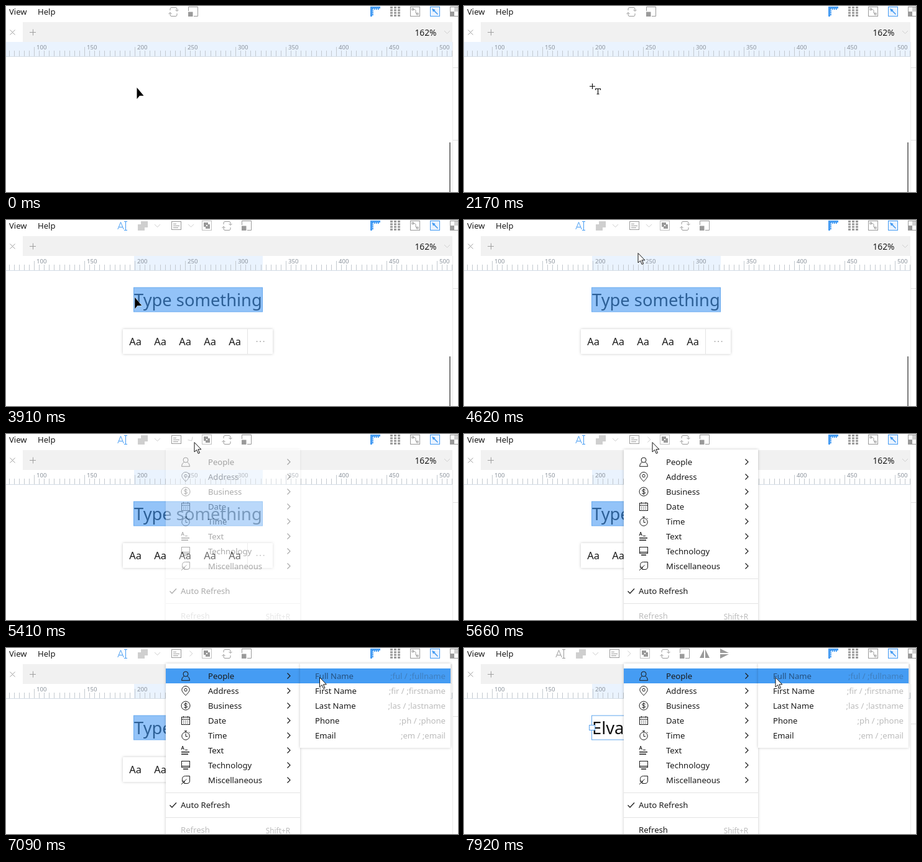
An HTML page for the animation above (8 s loop, 727 by 300 pixels).

```html
<!DOCTYPE html>
<html lang="en">
<head>
<meta charset="utf-8">
<title>Text tool demo</title>
<style>
  html, body { margin: 0; width: 100%; height: 100%; overflow: hidden; background: #fff; }
  svg { display: block; font: 13.1px "Noto Sans", "Open Sans", sans-serif; fill: #1a1a1a; }
  .line { fill: none; stroke: currentColor; }
  .solid { fill: currentColor; }
  .big { font-size: 27.3px; }
  .ruler { font-size: 9.6px; fill: #8a929b; }
  .hint { fill: #bcbcbc; }
  .hot .name { fill: #24507f; }
  .hot .hint { fill: #3f7fbf; }
  .panel { fill: #fff; filter: drop-shadow(0 0 2px rgba(0, 0, 0, .22)); }
</style>
</head>
<body>
<svg id="stage" width="727" height="300" viewBox="0 0 727 300"></svg>
<script>
const LOOP = 8000, FRAME = 70, ROW = 24;
const BLUE = '#459cf3', GREY = '#9a9a9a', PALE = '#cfcfcf', TINT = '#eaf3fe', INK = '#1a1a1a';

const rect = (x, y, w, h, fill, more = '') =>
  `<rect x="${x}" y="${y}" width="${w}" height="${h}" fill="${fill}" ${more}/>`;
const text = (x, y, s, more = '') => `<text x="${x}" y="${y}" ${more}>${s}</text>`;
const line = (d, color, w = 1) => `<path d="${d}" fill="none" stroke="${color}" stroke-width="${w}"/>`;
const group = (id, body) => `<g id="${id}">${body}</g>`;
const at = (x, y, body, color = GREY) =>
  `<g transform="translate(${x} ${y})" color="${color}">${body}</g>`;
const stroke = d => `<path class="line" d="${d}"/>`;
const solid = d => `<path class="solid" d="${d}"/>`;
const ring = (x, y, r) => `<circle class="line" cx="${x}" cy="${y}" r="${r}"/>`;
const box = (x, y, w, h) => rect(x, y, w, h, 'none', 'class="line"');
const fill = (x, y, w, h) => rect(x, y, w, h, 'none', 'class="solid"');
const repeat = (n, f) => Array.from({ length: n }, (_, i) => f(i)).join('');
const frame = box(.5, .5, 15, 15);
const triangles = solid('M0 15H7V1ZM9 1V15H16Z');

const icon = {
  type: stroke('M.8 14L5.5 2.5 10.2 14M2.4 10.5H8.6M13.5 1.5V15.5M11 1.5H16M11 15.5H16'),
  merge: solid('M0 6H5V1H16V11H11V16H0Z'),
  down: stroke('M0 0L4.5 4.5 9 0'),
  list: box(.5, 1.5, 15, 13) + stroke('M3 5.5H8M3 8.5H13M3 11.5H11'),
  mask: `<g opacity=".6">${frame}</g>` + solid('M3 3H10V6H13V13H6V10H3Z') + rect(7, 7, 2, 2, '#fff'),
  refresh: stroke('M3 6V4Q3 1.5 5 1.5H12Q14 1.5 14 4V7M11.5 5L14 7.5 16.5 5' +
    'M14 11V13Q14 15.5 12 15.5H5Q3 15.5 3 13V9.5M.5 12L3 9.5 5.5 12'),
  corner: stroke('M.5 7V.5H15.5V15.5H9') + fill(0, 8.5, 7.5, 7.5),
  flipX: triangles,
  flipY: `<g transform="rotate(90 8 8)">${triangles}</g>`,
  rulers: fill(0, 0, 16, 3) + fill(0, 0, 3, 16) +
    repeat(5, i => fill(i * 3, 0, 2, 5) + fill(0, i * 3, 5, 2)),
  grid: repeat(12, i => fill(i % 3 * 6, (i / 3 | 0) * 4.3, 4, 3)),
  flow: frame + box(3, 3, 2.5, 2.5) + box(10.5, 10.5, 2.5, 2.5) + stroke('M6 4.5Q10 5 9 8T11 11'),
  pen: rect(.5, .5, 15, 15, TINT) + frame + solid('M3 3L8.5 5 7.5 6.3 13 12 12 13 6.3 7.5 5 8.5Z'),
  checker: frame + `<g opacity=".45">${fill(7, 1, 8, 7)}</g>` + fill(1, 8, 6, 7)
};

const items = {
  People: ring(8, 5, 4) + stroke('M5.5 8.5Q1.5 10 1.5 15.3H14.5Q14.5 10 10.5 8.5'),
  Address: ring(8, 6.5, 2.2) + stroke('M8 15.5Q1.8 9.5 1.8 6.5A6.2 6 0 0 1 14.2 6.5Q14.2 9.5 8 15.5Z'),
  Business: ring(8, 8, 7) + stroke('M10.5 6Q10 4.6 8 4.6T5.6 6.3Q5.6 7.6 8 8T10.5 9.8Q10.4 11.4 8 11.4T5.4 10M8 3V13'),
  Date: box(1.5, 2.5, 13, 12) + stroke('M1.5 6H14.5M4.5 .8V3.5M11.5 .8V3.5') +
    repeat(6, i => fill(4 + i % 3 * 3.3, 8.5 + (i / 3 | 0) * 3, 1.5, 1)),
  Time: ring(8, 9, 6.2) + stroke('M8 5V9.5H11M6 .8H10M8 .8V2.8M13 2.5L14.5 4'),
  Text: stroke('M1 7L3.2 1 5.4 7M2 5H5M7 7.5H11') + fill(1, 10, 13, 1.5) + fill(1, 13.5, 11, 1.5),
  Technology: box(1.5, 1.5, 13, 10) + stroke('M1.5 9.5H14.5') + fill(4, 13.5, 8, 1.5),
  Miscellaneous: stroke('M14.5 1.5V9Q14.5 13.5 10 13.5H6L2.5 10V6.5Q2.5 1.5 7.5 1.5ZM1 15L9.5 6.5M6 9.8V13.5M2.5 10H6')
};
const fields = {
  'Full Name': ';ful / ;fullname', 'First Name': ';fir / ;firstname',
  'Last Name': ';las / ;lastname', Phone: ';ph / ;phone', Email: ';em / ;email'
};

// icons stand 32 px apart
const strip = (x, names) => names.map((n, i) => at(x + i * 32, 1, icon[n])).join('');

function ruler() {
  let ticks = '', labels = '';
  for (let i = -5; i < 84; i++) {
    const x = Math.round(45 + i * 8.1) + .5;
    if (x > 718) break;
    const major = i % 10 === 0;
    ticks += `M${x} ${major ? 66 : 72}V81`;
    if (major) labels += text(x + 3.5, 70, 100 + i * 5, 'class="ruler"');
  }
  return line(ticks, '#c3c9cf') + line('M0 81.5H718', '#d3dce5') + labels;
}

function tools() {
  return group('plain', strip(261, ['refresh', 'corner'])) +
    group('rich',
      group('typeIcon', at(179, 1, icon.type, 'inherit')) +
      at(212, 1, icon.merge, PALE) + at(239, 7, icon.down, PALE) + at(266, 1, icon.list) +
      group('fold', at(-4.5, -2.2, icon.down, PALE)) +
      strip(315, ['mask', 'refresh', 'corner']) + group('flips', strip(411, ['flipX', 'flipY'])));
}

function menu() {
  const rows = Object.entries(items).map(([name, glyph], i) =>
    at(0, i * ROW, at(281, 37, glyph, INK) + text(325, 50, name) +
      line('M452.5 40.5L457 45L452.5 49.5', INK, 1.2))).join('');
  return rect(257, 25, 216, 290, '#fff', 'class="panel"') +
    rect(257, 33, 216, ROW, BLUE, 'id="hotMain"') + rows +
    line('M257 233.5H473M257 273.5H473', '#e3e3e3') +
    line('M263.5 253.5L267 257 274 249.5', INK, 1.3) +
    text(281, 258, 'Auto Refresh') + text(281, 298, 'Refresh', 'id="again"') +
    text(457, 298.5, 'Shift+R', 'class="hint" text-anchor="end" font-size="11.8"');
}

function submenu() {
  const rows = Object.entries(fields).map(([name, key], i) =>
    `<g id="field${i}">` + text(497, 50 + i * ROW, name, 'class="name"') +
    text(707, 50 + i * ROW, key, 'class="hint" text-anchor="end"') + '</g>').join('');
  return rect(473, 25, 242, 136, '#fff', 'class="panel"') +
    rect(473, 33, 242, ROW, BLUE, 'id="hotSub"') + rows;
}

const side = (id, ...ys) => group(id, ys.map(y => line(`M719 ${y}H727`, '#e0e0e0')).join(''));

document.getElementById('stage').innerHTML =
  rect(0, 0, 727, 300, '#fff') +
  text(5, 14, 'View') + text(51, 14, 'Help') + tools() +
  at(586, 1, icon.rulers, BLUE) + strip(618, ['grid', 'flow']) +
  at(682, 1, icon.pen, BLUE) + at(714, 1, icon.checker) +
  rect(0, 26, 718, 32, '#f1f1f1') + rect(0, 26, 27, 32, '#fff') +
  line('M6.5 38.5L14.5 46.5M14.5 38.5L6.5 46.5', '#a0a0a0') +
  line('M38 42.5H48M43.5 37.5V47.5', '#a0a0a0') +
  text(657.5, 47.5, '162%', 'font-size="13.7"') + at(705, 40, icon.down, PALE) +
  rect(0, 58, 718, 24, TINT, 'id="band"') + rect(206, 58, 207, 24, TINT, 'id="span"') +
  ruler() + rect(205, 58, 2, 24, '#7fbaf6', 'id="mark"') +
  line('M718.5 58V300', '#ececec') +
  side('sideIdle', 99.5, 216.5) + side('sideEdit', 110.5) + side('sideDone', 122.5) +
  rect(713, 220, 2, 80, '#7c7c7c', 'id="scroll"') +
  group('draft', rect(205.5, 109, 207, 39, '#93c3f8', 'stroke="#66a9ef"') +
    text(206, 139, 'Type something', 'class="big" fill="#2c5f96"')) +
  group('filled', rect(205.5, 109, 150, 39, '#fff', 'stroke="#5ea5ee"') +
    text(206, 139, 'Elva Torrin', 'class="big" fill="#111"') +
    rect(201.5, 124.5, 9, 8, '#fff', 'stroke="#5ea5ee"')) +
  group('float', rect(188, 176, 241, 40, '#fff', 'class="panel" rx="1"') +
    repeat(5, i => text(208 + i * 40, 202, 'Aa', 'text-anchor="middle" font-size="16.4"')) +
    line('M388.5 176V216', '#e3e3e3') + repeat(3, i => rect(402.7 + i * 5.5, 195, 1.7, 1.7, '#a8a8a8'))) +
  group('menu', menu()) + group('sub', submenu()) +
  group('cross', line('M202 129.5H211M206.5 125V134', '#111', 1.2) +
    line('M211.5 135.5V133.5H219.5V135.5M215.5 133.5V142M213.5 142H217.5', '#111', 1.2)) +
  group('busy', '<circle cx="206" cy="129" r="9.8" fill="none" stroke="#5aa9ee" stroke-width="3.6"/>') +
  group('dark', '<path d="M0 0V18.5L4.4 13.2H11Z" fill="#000" stroke="#fff" paint-order="stroke"/>') +
  group('light', '<path d="M.5 .5V16L4.1 12.6 6.7 18.5 9 17.5 6.4 11.8H11.4Z" fill="#fff" stroke="#111"/>');

const $ = id => document.getElementById(id);
const clamp = v => Math.max(0, Math.min(1, v));
const smooth = p => p * p * (3 - 2 * p);
const rush = p => 1 - (1 - p) ** 4;

// moments in ms
const hide = 1250, tool = 2170, press = 2230, wait = 2960, typed = 3160, ready = 3210,
  edit = 3280, bar = 3470, leave = 4690, unfold = 5340, list = 6230, pick = 7420,
  settle = 7590, end = 7670;

// pointer moves: start, end, where to, easing
const moves = [
  { a: 1170, b: 1170, x: 206, y: 129 },
  { a: ready, b: ready, x: 205.5, y: 126.5 },
  { a: 3910, b: 4620, x: 279.5, y: 53 },
  { a: leave, b: 4920, x: 302.5, y: 13, ease: rush },
  { a: 6050, b: 6290, x: 329, y: 41 },
  { a: 6650, b: 6650, x: 351.5, y: 41 },
  { a: 6720, b: 7090, x: 504, y: 47 },
  { a: 7850, b: 7920, x: 500.5, y: 47 }
];

function pointer(t) {
  let x = 210.5, y = 131.5;
  for (const m of moves) {
    if (t < m.a) break;
    const steps = Math.round((m.b - m.a) / FRAME);
    const step = steps && (m.b - m.a) / steps;
    const p = t >= m.b ? 1 : (Math.floor((t - m.a) / step) + 1) / (steps + 1);
    const k = (m.ease || smooth)(p);
    x += (m.x - x) * k;
    y += (m.y - y) * k;
  }
  return { x, y };
}

const show = (id, on) => { $(id).style.display = on ? '' : 'none'; };
const fade = (id, v) => { $(id).style.opacity = v; show(id, v > 0); };

function draw(t) {
  const during = (from, to = LOOP) => t >= from && t < to;
  const { x, y } = pointer(t);
  const seen = !during(hide, ready), onCanvas = y > 82;

  for (const id of ['plain', 'band', 'sideIdle']) show(id, t < edit);
  for (const id of ['rich', 'span']) show(id, t >= edit);
  show('sideEdit', during(edit, end));
  show('sideDone', t >= end);
  show('mark', during(press, edit));
  show('scroll', t < leave);
  show('draft', during(typed, pick));
  show('filled', t >= pick);
  show('float', during(bar, pick + FRAME));
  show('cross', during(tool, press));
  show('busy', during(wait, ready));

  const open = t < unfold ? 0 : clamp((t - unfold + FRAME) / 390);
  fade('menu', open);
  fade('sub', t < list ? 0 : clamp((t - list + 60) / 120));
  $('fold').setAttribute('transform', `translate(297.5 9) rotate(${-90 * open})`);
  show('hotMain', t >= list - 60);
  const hot = t >= list && x > 473;
  show('hotSub', hot);
  $('field0').setAttribute('class', hot ? 'hot' : '');

  const done = t >= settle;
  $('rich').setAttribute('transform', `translate(${done ? -32 : 0} 0)`);
  $('typeIcon').firstChild.setAttribute('color', done ? GREY : BLUE);
  show('flips', done);
  $('again').setAttribute('fill', t >= pick ? INK : '#bcbcbc');

  show('dark', seen && onCanvas);
  show('light', seen && !onCanvas);
  $(onCanvas ? 'dark' : 'light').setAttribute('transform', `translate(${x} ${y})`);
}

const start = performance.now();
function tick() {
  draw((performance.now() - start) % LOOP);
  requestAnimationFrame(tick);
}
tick();
</script>
</body>
</html>
```
